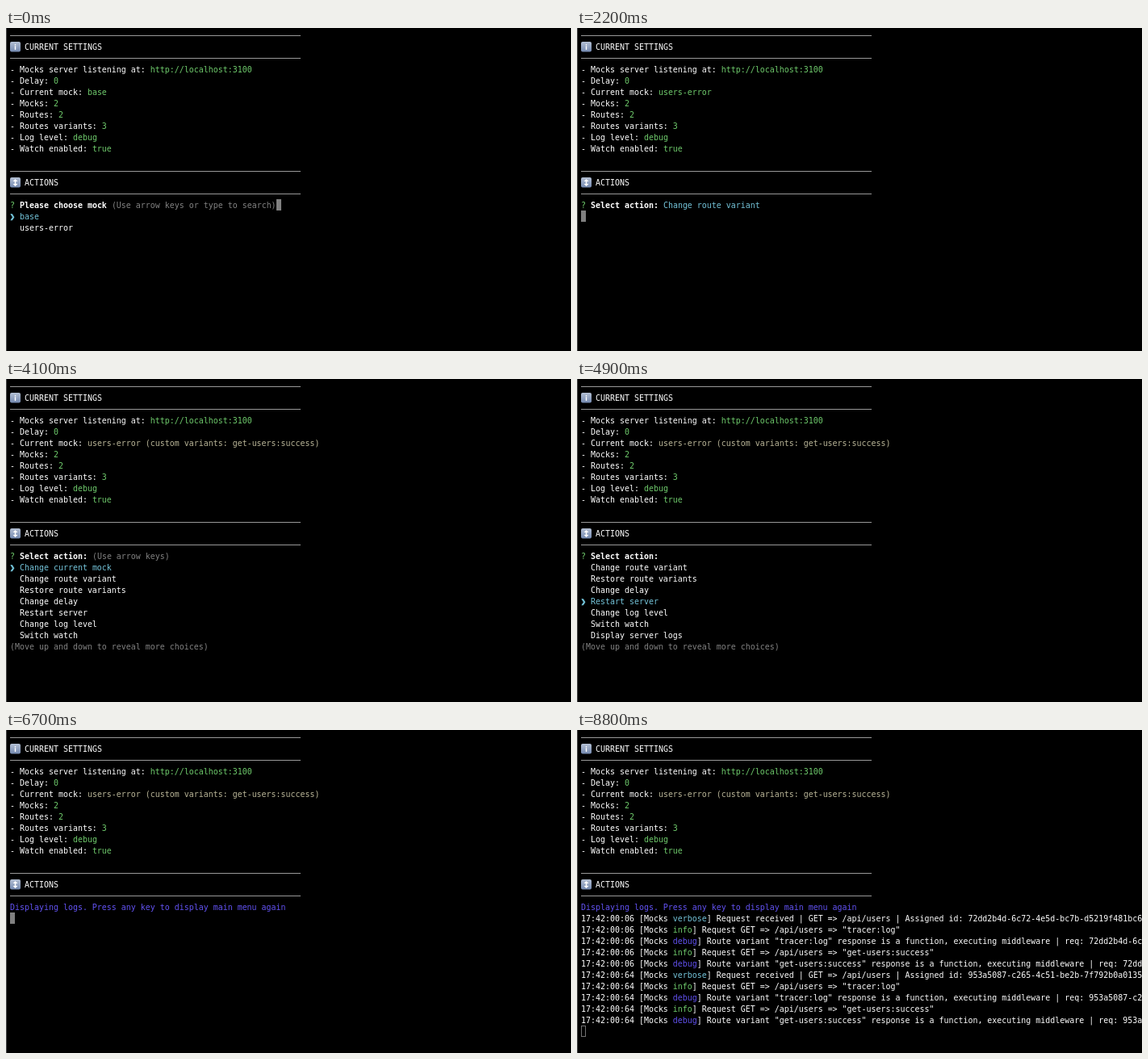
Recreate the animation shown at these times as an HTML page. Size 700x400 px, loop 9000 ms.

```html
<!DOCTYPE html>
<html lang="en">
<head>
<meta charset="utf-8">
<title>Terminal session</title>
<style>
html, body { margin: 0; width: 100%; height: 100%; overflow: hidden; background: #000; }
#term {
  position: absolute; inset: 0; box-sizing: border-box; overflow: hidden;
  padding: 3px 0 0 4px; border-left: 1px solid #4a4a4a;
  /* 9.967px gives a 6px cell */
  font: 9.967px/14px "DejaVu Sans Mono", monospace; color: #fff;
}
#term div { height: 14px; white-space: pre; }
.green { color: #6fcb6c; }
.yellow { color: #bab698; }
.cyan { color: #74c4da; }
.gray { color: #828282; }
.blue { color: #6252f2; }
.rule, .cursor, .pointer, svg { display: inline-block; vertical-align: top; }
.rule { height: 1px; margin-top: 6px; background: #989898; }
.cursor { width: 6px; height: 14px; margin-top: -1px; box-sizing: border-box; background: #808080; }
.hollow { background: none; border: 1px solid #707070; }
.pointer { width: 6px; height: 14px; -webkit-text-stroke: .8px; }
svg { margin-right: 5px; }
</style>
</head>
<body>
<div id="term"></div>
<script>
const LOOP = 9000;
const paint = (color, text) => `<span class="${color}">${text}</span>`;
const rule = cells => `<span class="rule" style="width:${cells * 6}px"></span>`;
const cursor = paint('cursor', '');
const hollowCursor = paint('cursor hollow', '');

const icon = path => `<svg width="13" height="13">
  <defs><linearGradient id="key" x2="0" y2="1">
    <stop stop-color="#b3bfd3"/><stop offset="1" stop-color="#7489b0"/>
  </linearGradient></defs>
  <rect width="13" height="12.5" rx="2" fill="url(#key)"/>
  <path d="${path}" fill="#fff"/></svg>`;
const infoIcon = icon('M5.8 3h1.4v1.4H5.8zM5.8 5.2h1.4V10H5.8z');
const arrowIcon = icon('M6.5 2 9.5 5H7.3V8H9.5L6.5 11 3.5 8H5.7V5H3.5z');

const heading = (sign, title) => [rule(60), sign + title, rule(60)];

function settings(mock) {
  const entries = [
    ['Mocks server listening at', 'http://localhost:3100'], ['Delay', 0],
    ['Current mock', mock], ['Mocks', 2], ['Routes', 2], ['Routes variants', 3],
    ['Log level', 'debug'], ['Watch enabled', 'true'],
  ];
  return [
    ...heading(infoIcon, 'CURRENT SETTINGS'),
    ...entries.map(([name, value]) =>
      `- ${name}: ` + paint(/custom/.test(value) ? 'yellow' : 'green', value)),
    '', ...heading(arrowIcon, 'ACTIONS'),
  ];
}

const question = text => `${paint('green', '?')} <b>${text}</b> `;
const option = (text, active) =>
  active ? paint('cyan', `${paint('pointer', '❯')} ${text}`) : '  ' + text;
const answer = (text, value) => [question(text) + paint('cyan', value), cursor];

const choose = (text, options, selected) => [
  question(text) + (selected ? '' : paint('gray', '(Use arrow keys or type to search)')) + cursor,
  ...options.map((name, i) => option(name, i === selected)),
];

const actions = [
  'Change current mock', 'Change route variant', 'Restore route variants', 'Change delay',
  'Restart server', 'Change log level', 'Switch watch', 'Display server logs', rule(14), 'Exit',
];

function menu(selected) {
  const first = Math.max(0, selected - 3);
  const rows = Array.from({ length: 7 }, (_, i) => first + i);
  return [
    question('Select action:') + (selected ? '' : paint('gray', '(Use arrow keys)')),
    ...rows.map(i => option(actions[i % actions.length], i === selected)),
    paint('gray', '(Move up and down to reveal more choices)'),
  ];
}

const levels = { verbose: 'cyan', info: 'green', debug: 'blue' };

function requestLog(time, id) {
  const line = (level, text) => `${time} [Mocks ${paint(levels[level], level)}] ${text}`;
  const variantLines = name => [
    line('info', `Request GET =&gt; /api/users =&gt; "${name}"`),
    line('debug', `Route variant "${name}" response is a function, executing middleware | req: ${id}`),
  ];
  return [
    line('verbose', `Request received | GET =&gt; /api/users | Assigned id: ${id}`),
    ...variantLines('tracer:log'), ...variantLines('get-users:success'),
  ];
}

const logs = (end, ...lines) =>
  [paint('blue', 'Displaying logs. Press any key to display main menu again'), ...lines, end];

const mocks = ['base', 'users-error'];
const variants = ['tracer:log', 'get-users:success', 'get-users:error'];
const askMock = 'Please choose mock', askVariant = 'Please choose route variant';
const base = settings('base');
const error = settings('users-error');
const custom = settings('users-error (custom variants: get-users:success)');
const firstLog = requestLog('17:42:00:06', '72dd2b4d-6c72-4e5d-bc7b-d5219f481bc6');
const secondLog = requestLog('17:42:00:64', '953a5087-c265-4c51-be2b-7f792b0a0135');

// [start in ms, settings block, prompt block]
const screens = [
  [0, base, choose(askMock, mocks, 0)],
  [800, base, choose(askMock, mocks, 1)],
  [1000, error, menu(0)],
  [1500, error, menu(1)],
  [2000, error, answer('Select action:', actions[1])],
  [2300, error, choose(askVariant, variants, 0)],
  [2900, error, choose(askVariant, variants, 1)],
  [3500, error, answer(askVariant, variants[1])],
  [3700, custom, menu(0)],
  ...[4200, 4500, 4700, 4900, 5300, 5500, 5800].map((start, i) => [start, custom, menu(i + 1)]),
  [6300, custom, answer('Select action:', actions[7])],
  [6500, custom, logs(cursor)],
  [7200, custom, logs(hollowCursor)],
  [8000, custom, logs(hollowCursor, ...firstLog)],
  [8600, custom, logs(hollowCursor, ...firstLog, ...secondLog)],
];

const term = document.getElementById('term');
let shown;

function render() {
  const time = performance.now() % LOOP;
  const screen = screens.findLast(([start]) => start <= time);
  if (screen !== shown) {
    shown = screen;
    term.innerHTML = [...screen[1], ...screen[2]].map(row => `<div>${row}</div>`).join('');
  }
  requestAnimationFrame(render);
}
render();
</script>
</body>
</html>
```
